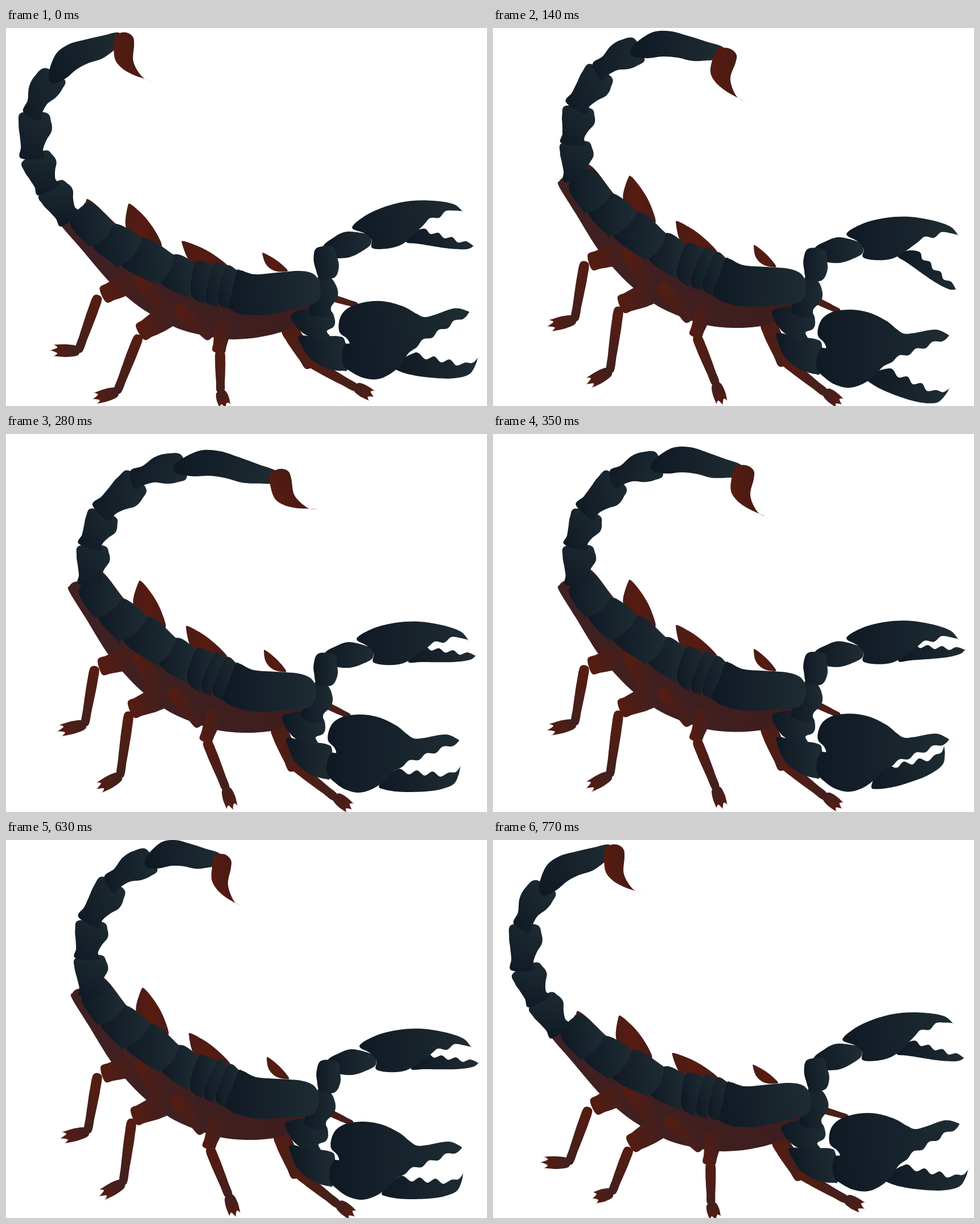
An HTML page with a canvas for the animation above (840 ms loop, 845 by 663 pixels).

```html
<!DOCTYPE html>
<html lang="en">
<head>
<meta charset="utf-8">
<title>Scorpion</title>
<style>
html, body { margin: 0; width: 100%; height: 100%; overflow: hidden; background: #fff; }
canvas { display: block; }
</style>
</head>
<body>
<canvas id="stage" width="845" height="663"></canvas>
<script>
const ctx = document.getElementById('stage').getContext('2d');
const STEP = 70, STEPS = 12;

const SHELL = ['#0f1924', '#1f2c33'];
const LIMB = ['#561c11', '#42201e'];
const BELLY = ['#402123', '#3e1d1d'];
const FADE = ['#571c10', '#3f2021'];
const WING = ['#4b1c16', '#581b10', '#451d1a'];
const STING = ['#591b10', '#421b16'];

const rad = degrees => degrees * Math.PI / 180;

function along(a, b, t, offset) {
  const dx = b[0] - a[0], dy = b[1] - a[1], len = Math.hypot(dx, dy);
  return [a[0] + dx * t - dy / len * offset, a[1] + dy * t + dx / len * offset];
}

// Closed smooth curve through the points; a doubled point makes a corner.
function part(coords, colors = SHELL, dir = 'x') {
  const n = coords.split(/[ ,]+/).map(Number), p = [];
  for (let i = 0; i < n.length; i += 2) p.push([n[i], n[i + 1]]);
  const at = i => p[(i + p.length) % p.length];
  const path = new Path2D();
  path.moveTo(...p[0]);
  for (let i = 0; i < p.length; i++) {
    const [a, b, c, d] = [at(i - 1), at(i), at(i + 1), at(i + 2)];
    path.bezierCurveTo(b[0] + (c[0] - a[0]) / 6, b[1] + (c[1] - a[1]) / 6,
      c[0] - (d[0] - b[0]) / 6, c[1] - (d[1] - b[1]) / 6, c[0], c[1]);
  }
  const xs = p.map(q => q[0]), ys = p.map(q => q[1]);
  const l = Math.min(...xs), r = Math.max(...xs), t = Math.min(...ys), b = Math.max(...ys);
  const ends = { x: [l, t, r, t], d: [l, t, r, b], u: [l, b, r, t] }[dir];
  const fill = ctx.createLinearGradient(...ends);
  colors.forEach((c, i) => fill.addColorStop(i / (colors.length - 1), c));
  return () => { ctx.fillStyle = fill; ctx.fill(path); };
}

// Outline around the axis a-b with the given widths on each side.
function profile(a, b, right, left = right) {
  const side = (widths, sign) => widths.map((w, i) => along(a, b, i / (widths.length - 1), sign * w));
  return [...side(right, 1), ...side(left, -1).reverse()].join(' ');
}

const limb = (a, b, w, colors = LIMB) =>
  part(profile(a, b, [0.8, 1, 0.95, 0.85, 0.7].map(k => k * w)), colors);

const wing = (a, b, w) => part(profile(a, b,
  [0.1, 0.8, 1, 0.8, 0.15].map(k => k * w), [0.1, 0.25, 0.3, 0.25, 0.1].map(k => k * w)), WING);

// Scalloped edge of n teeth from a to b.
const teeth = (a, b, n, depth) => Array.from({ length: 2 * n + 1 },
  (_, i) => along(a, b, i / (2 * n), i % 2 ? depth : -depth)).join(' ');

function foot(len) {
  const toes = [[0, -7], [len * 0.4, -11]];
  for (const side of [-1, 0, 1]) {
    const toe = [len * (1 - 0.12 * Math.abs(side)), side * 10];
    toes.push(toe, toe);
    if (side < 1) toes.push([len * 0.76, side * 10 + 5]);
  }
  return part([...toes, [len * 0.4, 11], [0, 7]].join(' '), ['#42201e', '#561c11']);
}

function place(draw, x, y, degrees, sx = 1, sy = 1) {
  ctx.save();
  ctx.translate(x, y);
  ctx.rotate(rad(degrees));
  ctx.scale(sx, sy);
  draw();
  ctx.restore();
}

const turn = (draw, x, y, degrees) =>
  place(() => { ctx.translate(-x, -y); draw(); }, x, y, degrees);

const run = list => list.forEach(draw => draw());

const toes = foot(36);
const farLegs = [
  wing([240, 262], [283, 340], 32),
  wing([323, 341], [392, 394], 26),
  wing([459, 382], [496, 418], 14),
  limb([560, 474], [608, 497], 6),
  limb([482, 515], [513, 590], 15),
  limb([510, 582], [584, 640], 9),
  () => place(toes, 584, 638, 38)
];

const belly = part('127 261 117 268 116 278 145 325 180 382 202 410 240 450 290 488 340 510 380 522 430 526 480 521 515 505 530 482 400 430 250 330 178 247 164 246 150 262', BELLY);

const hips = [
  limb([230, 393], [170, 411], 19, FADE),
  limb([238, 384], [276, 458], 16, FADE),
  limb([280, 463], [224, 486], 20, FADE),
  limb([295, 452], [346, 512], 12, FADE),
  limb([374, 489], [355, 541], 14, FADE)
];

// angle and heel are resting directions; sway counters the tilt of the body
const legs = [
  { knee: [161, 412], len: 101, angle: 100, width: 9, step: 49, heel: 166, sway: [2.1, 2.7] },
  { knee: [221, 492], len: 111, angle: 98, width: 9, step: 47, heel: 151, sway: [2.5, 2.4] },
  { knee: [358, 541], len: 90, angle: 68, width: 9, step: 38, heel: 72, sway: [3.4, 1.1] }
].map(leg => ({ ...leg, shin: limb([0, 0], [leg.len, 0], leg.width), foot: foot(leg.step) }));

// Cross lines of the back from tail to head: top and bottom ends
const ribs = [
  [[173, 247], [133, 277]], [[208, 290], [160, 324]], [[254, 322], [203, 366]], [[304, 360], [267, 407]],
  [[338, 379], [321, 440]], [[371, 387], [344, 454]], [[390, 395], [365, 461]], [[410, 404], [390, 471]]
];
const plates = ribs.slice(1).map(([top, bottom], i) => {
  const [start, end] = ribs[i], bulge = i < 3 ? -7 : 2;
  const low = along(start, end, i ? 0.88 : 1, 0);
  return part([start, top, top, along(top, bottom, 0.35, bulge), along(top, bottom, 0.7, bulge),
    bottom, bottom, low].join(' '));
}).reverse();

const thorax = part('408 406 416 405 440 416 480 419 518 422 541 431 550 450 547 470 536 482 500 486 450 489 412 483 390 472 386 462 396 437');

const farArm = {
  wrist: part(profile([566, 392], [648, 384], [14, 21, 24, 20, 11], [6, 16, 21, 16, 5])),
  finger: part(`712 402 722 384 ${teeth([740, 377], [815, 388], 3, 3)} 830 391 830 391 820 398 790 402 735 402`),
  claw: part(`621 361 650 343 690 333 730 331 770 337 803 348 817 363 817 363 ${teeth([803, 357], [745, 373], 2, 3)} 715 398 695 406 670 407 650 402 651 387 640 374`),
  root: part(profile([560, 440], [542, 505], [12, 7, 7, 20, 16], [10, 24, 26, 17, 18])),
  elbow: part(profile([568, 388], [564, 442], [14, 21, 19, 12], [14, 20, 22, 13]))
};

const nearArm = {
  lower: part('499 535 530 541 568 546 578 558 575 603 566 607 540 599 515 580 503 557'),
  upper: part('490 500 500 492 530 489 560 499 566 516 562 528 549 534 552 546 522 541 502 525'),
  finger: part(`660 620 670 605 690 591 ${teeth([699, 594], [782, 600], 3, 4)} 795 595 803 585 803 585 800 600 790 617 760 627 720 630 690 629 668 625`),
  claw: part(`572 523 581 507 600 497 630 494 660 499 690 513 709 528 722 536 740 535 777 529 798 537 800 541 ${teeth([788, 547], [700, 583], 3, 3)} 685 594 670 610 650 624 625 631 600 625 580 611 569 598 569 578 576 562 585 561 581 551 571 540`)
};

// Tail parts lie along the x axis from their joint.
const ring = len => ({ len, draw: part(profile([-4, 0], [len, 0], [17, 17, 23, 32, 31, 22], [22, 22, 24, 26, 21]), SHELL, 'd') });
const tail = [
  ring(64), ring(62), ring(76),
  { len: 76, draw: part(profile([-8, 0], [78, 0], [15, 13, 13, 20, 22, 17], [16, 20, 30, 31, 22]), SHELL, 'd') },
  { len: 142, draw: part(profile([-12, 0], [148, 0], [10, 13, 9, 10, 15, 13, 9], [7, 32, 36, 29, 20, 10])) }
];
const sting = part('6 -10 20 -7 29 3 27 17 18 45 28 74 43 84 43 84 10 66 -10 48 -17 28 -7 -5', STING);

// lift: heading of the first tail part; lean: first bend; reach: length of the last part
const upright = {
  x: 0, y: 0, tilt: 0, fingers: [0, 0], legs: [1, 1, 1],
  root: [147, 264], lift: 94, lean: 10, stretch: 1, reach: 142, sting: [0, 1]
};
const crouched = {
  x: 3, y: 11, tilt: -8.9, fingers: [17.6, 16], legs: [1, 0.94, 0.77],
  root: [113, 332], lift: 126, lean: 10, stretch: 1, reach: 128, sting: [-13.5, 0.87]
};
const keys = [
  [0, crouched],
  [2, { ...upright, fingers: [35, 21] }],
  [4, { ...upright, x: -5, y: -2, root: [150, 260], lift: 90, lean: 19.5, stretch: 1.1, reach: 160, sting: [-28, 0.95] }],
  [5, { ...upright, y: -3.5, fingers: [-4.5, -16], root: [150, 260], lift: 92, lean: 18, stretch: 1.03, reach: 139, sting: [-5.5, 0.95] }],
  [7, { ...upright, fingers: [-15, -20], root: [151, 265] }],
  [9, { ...upright, root: [152, 268], lift: 97, lean: 11, stretch: 1.03, reach: 116, sting: [-4.5, 0.8] }],
  [11, { ...crouched, x: 9, root: [119, 332], legs: [1, 0.75, 0.77] }]
];

function mix(a, b, f) {
  if (typeof a === 'number') return a + (b - a) * f;
  if (Array.isArray(a)) return a.map((v, i) => mix(v, b[i], f));
  return Object.fromEntries(Object.keys(a).map(k => [k, mix(a[k], b[k], f)]));
}

function poseAt(step) {
  const next = keys.findIndex(([at]) => at >= step);
  const [to, b] = keys[next], [from, a] = keys[Math.max(0, next - 1)];
  return mix(a, b, to === from ? 1 : (step - from) / (to - from));
}

function drawBody(pose) {
  run(farLegs);
  belly();
  legs.forEach((leg, i) => {
    const [x, y] = leg.knee, size = pose.legs[i];
    const angle = leg.angle - pose.tilt * leg.sway[0], reach = leg.len * size;
    place(leg.shin, x, y, angle, size);
    place(leg.foot, x + reach * Math.cos(rad(angle)), y + reach * Math.sin(rad(angle)),
      leg.heel - pose.tilt * leg.sway[1], size);
  });
  run(hips);
  run([nearArm.lower, nearArm.upper, farArm.wrist]);
  turn(farArm.finger, 715, 398, pose.fingers[0]);
  run([farArm.claw, farArm.root, farArm.elbow]);
  turn(nearArm.finger, 675, 605, pose.fingers[1]);
  nearArm.claw();
  run(plates);
  thorax();
}

function drawTail({ root: [x, y], lift, lean, stretch, reach, sting: [angle, width] }) {
  const bends = [0, lean, lean + 26, lean + 57, 96];
  const sizes = [1, 1, stretch, stretch, reach / 142];
  tail.forEach(({ len, draw }, i) => {
    const heading = bends[i] - lift;
    place(draw, x, y, heading, sizes[i]);
    x += len * sizes[i] * Math.cos(rad(heading));
    y += len * sizes[i] * Math.sin(rad(heading));
  });
  place(sting, x, y, angle, width, 1);
}

function frame() {
  const pose = poseAt(Math.floor(performance.now() / STEP) % STEPS);
  ctx.fillStyle = '#fff';
  ctx.fillRect(0, 0, 845, 663);
  ctx.save();
  ctx.translate(pose.x, pose.y);
  turn(() => drawBody(pose), 470, 452, pose.tilt);
  ctx.restore();
  drawTail(pose);
  requestAnimationFrame(frame);
}
frame();
</script>
</body>
</html>
```
